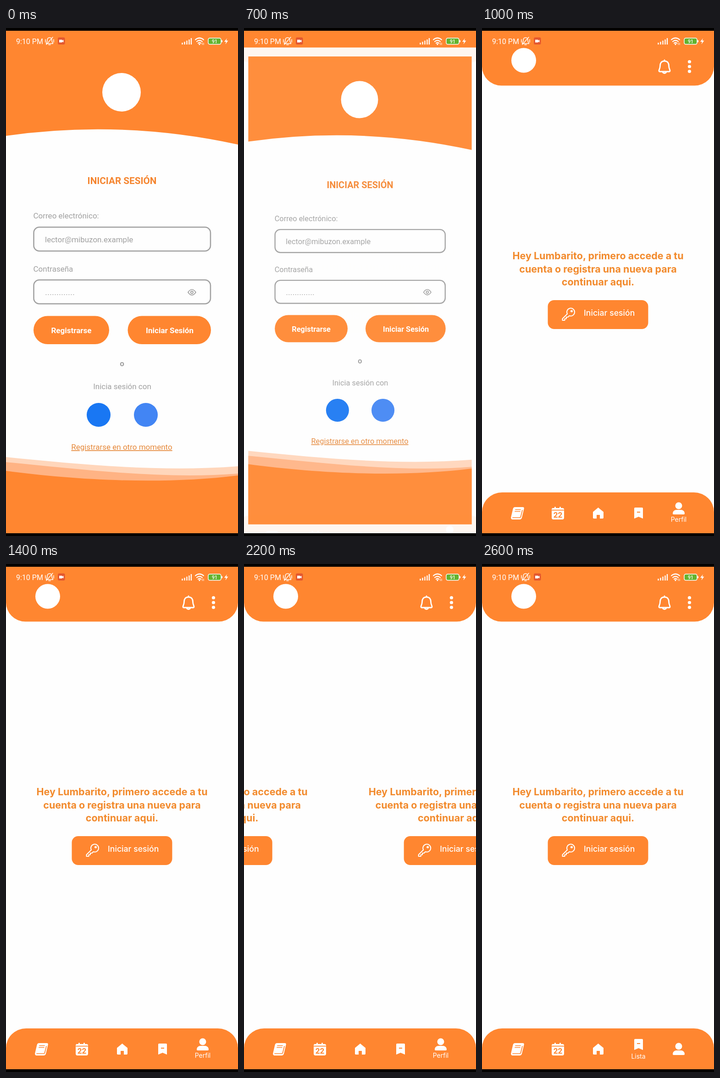
Animation of 506 by 1107 pixels, one loop 2.7 s. Source, as an HTML page:

```html
<!DOCTYPE html>
<html lang="es">
<head>
<meta charset="utf-8">
<style>
html, body { margin: 0; width: 100%; height: 100%; overflow: hidden; background: #000; }
svg { display: block; width: 506px; height: 1107px; }
text { font-family: Roboto, sans-serif; font-size: 17px; }
.mid { text-anchor: middle; }
.bold { font-weight: 700; }
.grey { fill: #a0a0a0; }
.orange { fill: #ff8630; }
.title { fill: #f5852f; }
.white { fill: #fff; }
.inter text, text.inter { font-family: Inter, sans-serif; }
.line { fill: none; stroke: #fff; stroke-width: 2.4; stroke-linecap: round; stroke-linejoin: round; }
.field { fill: none; stroke: #a0a0a0; stroke-width: 2.5; }
.eye { fill: none; stroke: #999; stroke-width: 1.6; }
</style>
</head>
<body>
<svg viewBox="0 0 506 1107">
<defs>
  <clipPath id="screen"><rect y="42" width="506" height="1059"/></clipPath>
  <g id="page" class="inter">
    <g class="mid bold" fill="#f28a2c" style="text-anchor:middle">
      <text x="253" y="504" style="font-size:21.5px">Hey Lumbarito, primero accede a tu</text>
      <text x="253" y="532.5" style="font-size:21.5px">cuenta o registra una nueva para</text>
      <text x="253" y="561" style="font-size:21.5px">continuar aqui.</text>
    </g>
    <rect class="orange" x="143.5" y="593" width="219" height="63" rx="14"/>
    <g class="line" style="stroke-width:2">
      <path d="M186 623 L175.500 633.500 V637 H180.500 V633.500 H184 V630 H187.500 L190.500 627 A8.500 8.500 0 1 0 186 623 Z"/>
      <circle cx="195.500" cy="617" r="1.500"/>
    </g>
    <text class="white" x="222" y="627" style="font-size:17.7px;font-weight:500">Iniciar sesión</text>
  </g>
</defs>

<rect y="6" width="506" height="1095" fill="#fefefe"/>

<g clip-path="url(#screen)">
  <g id="home">
    <rect y="42" width="506" height="1059" fill="#fefefe"/>
    <use id="pageA" href="#page"/>
    <use id="pageB" href="#page"/>
    <path class="orange" d="M0 42 H506 V83 A42 42 0 0 1 464 125.500 H42 A42 42 0 0 1 0 83 Z"/>
    <circle class="white" cx="91" cy="70.500" r="27"/>
    <g class="line" style="stroke-width:2.8">
      <path d="M398 72 C391 72 388.500 77 388.500 82 C388.500 89 386 90 386 93 Q386 95 388 95 H408 Q410 95 410 93 C410 90 407.500 89 407.500 82 C407.500 77 405 72 398 72 V70"/>
      <path d="M394.500 97 Q398 100 401.500 97"/>
    </g>
    <g class="white">
      <circle cx="452.500" cy="73.500" r="3.600"/>
      <circle cx="452.500" cy="84" r="3.600"/>
      <circle cx="452.500" cy="94.500" r="3.600"/>
    </g>

    <path class="orange" d="M0 1101 V1055 A44 43 0 0 1 44 1012 H462 A44 43 0 0 1 506 1055 V1101 Z"/>
    <g class="white">
      <path d="M72 1044 H89 Q92.500 1044 91.500 1048 L87 1067 Q86 1071 82 1071 H66 Q62 1070 63.500 1065 L67.500 1048 Q68.500 1044 72 1044 Z"/>
      <path d="M155 1046 H158 V1043.500 H161 V1046 H169 V1043.500 H172 V1046 H175 Q179 1046 179 1049 V1067 Q179 1071 175 1071 H156 Q152 1071 152 1067 V1049 Q152 1046 155 1046 Z"/>
      <path d="M253.500 1045 L265 1054.500 V1067 Q265 1069 263 1069 H257 V1061 H250 V1069 H244 Q242 1069 242 1067 V1054.500 Z"/>
    </g>
    <g class="line" style="stroke:#ff8630;stroke-width:1.700">
      <path d="M73 1049.500 H84 M72 1053.500 H83 M88 1051 L84.500 1065 Q84 1067 82 1067 H67"/>
      <path d="M153 1050.700 H178"/>
    </g>
    <text class="mid bold orange" x="165.500" y="1067" style="font-size:17px">22</text>
    <g id="listIcon">
      <path class="white" d="M334 1045 H349 Q351 1045 351 1047 V1069 L341.500 1065 L332 1069 V1047 Q332 1045 334 1045 Z"/>
      <path d="M338 1055 H345" stroke="#ff8630" stroke-width="2"/>
    </g>
    <g id="userIcon" class="white">
      <circle cx="429" cy="1051" r="7.500"/>
      <path d="M416 1068 C416 1063 420 1060 424 1060 H434 C438 1060 442 1063 442 1068 Q442 1070 440 1070 H418 Q416 1070 416 1068 Z"/>
    </g>
    <text id="listLabel" class="inter mid white" x="341" y="1078" style="font-size:14px">Lista</text>
    <text id="userLabel" class="inter mid white" x="429" y="1076" style="font-size:14px">Perfil</text>
  </g>

  <g id="login">
    <rect y="42" width="506" height="1059" fill="#fefefe"/>
    <path class="orange" d="M0 42 H506 V254 Q253 199 0 235 Z"/>
    <circle class="white" cx="252" cy="140" r="42"/>
    <text class="title mid bold" x="253" y="340" style="font-size:20.700px">INICIAR SESIÓN</text>
    <g class="grey">
      <text x="59.500" y="415">Correo electrónico:</text>
      <text x="85" y="467">lector@mibuzon.example</text>
      <text x="59.500" y="530.500">Contraseña</text>
      <text x="85" y="582" fill="#b4b4b4" style="font-size:19px">.............</text>
      <text class="mid bold" x="253" y="737">o</text>
      <text class="mid" x="253.500" y="787">Inicia sesión con</text>
    </g>
    <rect class="field" x="60.500" y="434" width="385.500" height="52" rx="12"/>
    <rect class="field" x="60.500" y="549" width="385.500" height="52" rx="12"/>
    <g class="eye">
      <path d="M397 576 Q405.500 563.500 414 576 Q405.500 588 397 576 Z"/>
      <circle cx="405.500" cy="576" r="2.600"/>
    </g>
    <rect class="orange" x="60" y="627.500" width="165" height="61.500" rx="30.700"/>
    <rect class="orange" x="265.500" y="627.500" width="181.500" height="61.500" rx="30.700"/>
    <g class="white bold">
      <text class="mid" x="142.500" y="665">Registrarse</text>
      <text class="mid" x="357" y="665">Iniciar Sesión</text>
    </g>
    <circle cx="202" cy="843" r="26" fill="#1977f3"/>
    <circle cx="305" cy="843" r="26" fill="#4285f4"/>
    <text class="mid" x="252.500" y="919" fill="#e6893b" text-decoration="underline">Registrarse en otro momento</text>
    <path fill="#ffd6bb" d="M0 935 C170 952 340 968 506 955 V1101 H0 Z"/>
    <path fill="#ffb384" d="M0 946 C170 962 340 984 506 971 V1101 H0 Z"/>
    <path class="orange" d="M0 965 C150 985 340 996 506 975 V1101 H0 Z"/>
  </g>
</g>

<rect class="orange" y="6" width="506" height="36.500"/>
<text class="white" x="22" y="34.500" style="font-size:16px">9:10 PM</text>
<g class="line" style="stroke-width:1.500">
  <path d="M95 21 C91 21 90 24 90 27 C90 31 88 32 87.500 34 H102.500 C102 32 100 31 100 27 C100 24 99 21 95 21 Z M93 36.500 H97 M88 36 L102 20 M86 25 V31 M104 25 V31"/>
</g>
<rect x="113" y="20.500" width="15.500" height="15.500" rx="3" fill="#e4572e"/>
<path class="white" d="M116 25.500 H122.500 V27.500 L125.500 25.500 V31.500 L122.500 29.500 V31.500 H116 Z"/>
<path d="M384.500 36 V32 M389.500 36 V30 M394.500 36 V27.500 M399.500 36 V25 M404 36 V22" stroke="#fff" stroke-width="2.300"/>
<g class="line" style="stroke-width:2.200">
  <path d="M413 25.500 Q422 18 431 25.500 M416 29.500 Q422 24.500 428 29.500 M419 33 Q422 30.500 425 33"/>
</g>
<circle class="white" cx="422" cy="35.500" r="1.700"/>
<path d="M428 32 V37 M431 32 V37" stroke="#fff"/>
<rect x="441" y="22" width="28" height="13.500" rx="3.500" fill="#63b32e" stroke="#fff" stroke-width="1.500"/>
<path d="M471 26.500 V31" stroke="#fff" stroke-width="2"/>
<text class="mid white" x="455" y="32.500" style="font-size:10.500px;font-weight:500">91</text>
<path class="white" d="M482 22.500 L476 30 H480 L478.500 35.500 L484.500 27.500 H480.500 Z"/>
</svg>

<script>
const LOOP = 2700, STEP = 100, WIDTH = 506;
const $ = id => document.getElementById(id);
const ramp = (t, from, to) => Math.min(1, Math.max(0, (t - from) / (to - from)));
const smooth = u => u * u * (3 - 2 * u);
const set = (id, name, value) => $(id).setAttribute(name, value);
const zoom = (id, s) =>
  set(id, 'transform', `translate(253 572) scale(${s}) translate(-253 -572)`);
const shift = (id, x, y) => set(id, 'transform', `translate(${x} ${y})`);

function draw(t) {
  // Login shrinks away while the home screen settles into place.
  const p = smooth(ramp(t, 600, 900)), fade = p * p;
  zoom('login', 1 - 0.143 * p);
  set('login', 'opacity', 1 - fade);
  zoom('home', 1.15 - 0.15 * p);
  set('home', 'opacity', fade);

  // Pages swipe right, then the tab bar follows.
  const x = WIDTH * smooth(ramp(t, 2000, 2458));
  shift('pageA', x, 0);
  shift('pageB', x - WIDTH, 0);
  const tab = ramp(t, 2250, 2400);
  shift('userIcon', 0, -10 * (1 - tab));
  shift('listIcon', 0, -10 * tab);
  set('userLabel', 'opacity', 1 - tab);
  set('listLabel', 'opacity', tab);
}

const start = performance.now();
function tick() {
  const t = (performance.now() - start) % LOOP;
  draw(Math.floor(t / STEP) * STEP);
  requestAnimationFrame(tick);
}
tick();
</script>
</body>
</html>
```
